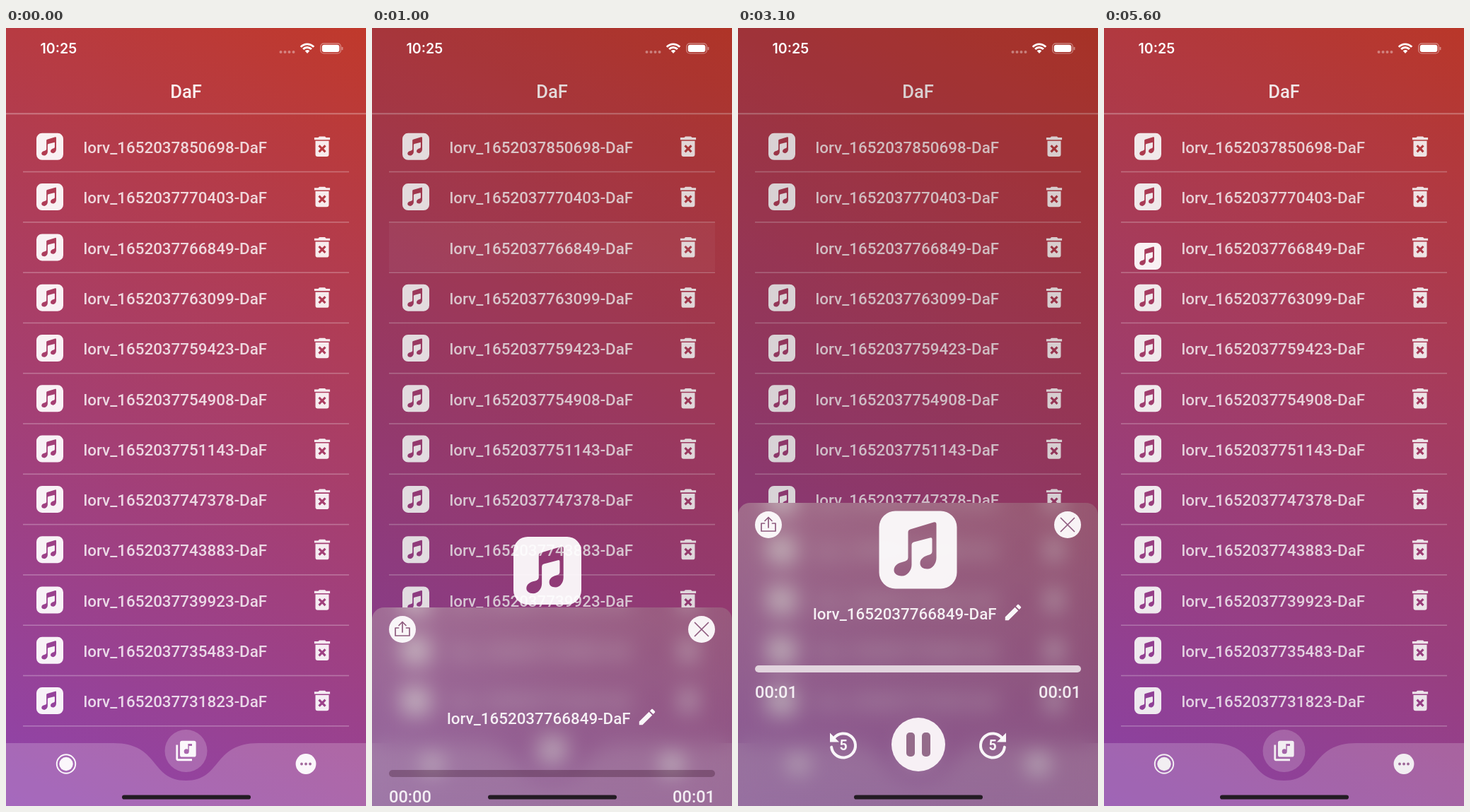
These frames come from a looping animation (509 by 1101 pixels, 5.7 s). An HTML page with a canvas:

```html
<!DOCTYPE html>
<html lang="de">
<head>
<meta charset="utf-8">
<title>DaF</title>
<style>
html, body { margin: 0; width: 100%; height: 100%; overflow: hidden; background: #a03f66; }
canvas { display: block; width: 509px; height: 1101px; }
</style>
</head>
<body>
<canvas id="stage"></canvas>
<script>
const W = 509, H = 1101, LOOP = 5700, STEP = 100;
const PITCH = 71.3, REST = 672;
const SANS = 'Roboto, sans-serif';
const ROW_FONT = '500 22.4px ' + SANS;
const dpr = window.devicePixelRatio || 1;
const view = document.getElementById('stage');
const back = document.createElement('canvas');
for (const c of [view, back]) { c.width = W * dpr; c.height = H * dpr; }
const front = view.getContext('2d');
const scene = back.getContext('2d');

const label = id => `lorv_1652037${id}-DaF`;
const rows = ['850698', '770403', '766849', '763099', '759423', '754908',
  '751143', '747378', '743883', '739923', '735483', '731823'].map(label);
const PICKED = 2;

const NOTE = 'M41 30Q41 27 44 26L77 16Q81 15 81 19V66C81 74 76 82 68 82C62 82 58 79 58 74' +
  'C58 67 64 64 71 62Q75 61 75 57V40Q75 37 72 38L49 44Q46 45 46 48V76C46 84 40 92 32 92' +
  'C25 92 21 88 21 84C21 77 27 73.5 34 72Q41 70.5 41 66Z';
const tilePath = new Path2D(NOTE);
tilePath.roundRect(0, 0, 110, 110, 23);
const trashPath = new Path2D('M6 19a2 2 0 0 0 2 2h8a2 2 0 0 0 2-2V7H6zM8.46 11.88l1.41-1.41L12 12.59' +
  'l2.12-2.12 1.41 1.41L13.41 14l2.12 2.12-1.41 1.41L12 15.41l-2.12 2.12-1.41-1.41L10.59 14z' +
  'M15.5 4l-1-1h-5l-1 1H5v2h14V4z');
const pencilPath = new Path2D('M20.71 7.04c.39-.39.39-1.04 0-1.41l-2.34-2.34c-.37-.39-1.02-.39-1.41 0' +
  'l-1.84 1.83 3.75 3.75zM3 17.25V21h3.75L17.81 9.93l-3.75-3.75z');
const libraryPath = new Path2D('M4 6H2v14a2 2 0 0 0 2 2h14v-2H4zM20 2H8a2 2 0 0 0-2 2v12a2 2 0 0 0 2 2h12' +
  'a2 2 0 0 0 2-2V4a2 2 0 0 0-2-2zM18 7h-3v5.5a2.5 2.5 0 0 1-5 0a2.5 2.5 0 0 1 2.5-2.5' +
  'c.57 0 1.08.19 1.5.5V5h4z');
const barPath = new Path2D('M0 1012H152C218 1012 203 1065 254.5 1065C306 1065 291 1012 357 1012H509V1101H0Z');

// Motion tracks: [ms, value...]
const sheetTrack = [[700, H], [800, 1070], [900, 970], [1000, 820], [1100, 708], [1200, REST],
  [5300, REST], [5400, 726], [5500, 925], [5600, H]];
const dimTrack = [[700, 0], [900, .07], [1200, .13], [5300, .13], [5400, .12], [5600, .035], [5700, 0]];
const tileTrack = [[700, 62, 310.5, 38], [800, 112, 490, 48], [900, 216.5, 732, 71], [1000, 248, 768, 96],
  [1100, 254.5, 748, 107], [1200, 254.5, 738.5, 110], [5300, 254.5, 738.5, 110],
  [5400, 147.5, 611.5, 71], [5500, 84, 420, 47], [5600, 62, 323, 38], [5700, 62, 310.5, 38]];
const pressTrack = [[2000, 1], [2100, .85], [2200, .55], [2300, .62], [2400, .76], [2500, .9], [2600, 1]];
const morphTrack = [[2100, 0], [2200, .12], [2300, .35], [2400, .6], [2500, .82], [2600, 1],
  [3100, 1], [3200, .82], [3300, .6], [3400, .35], [3500, .12], [3600, 0]];

function at(track, ms) {
  if (ms <= track[0][0]) return track[0].slice(1);
  for (let i = 1; i < track.length; i++) {
    const a = track[i - 1], b = track[i];
    if (ms <= b[0]) {
      const k = (ms - a[0]) / (b[0] - a[0]);
      return a.slice(1).map((v, j) => v + (b[j + 1] - v) * k);
    }
  }
  return track[track.length - 1].slice(1);
}

const white = a => `rgba(255,255,255,${a})`;

function disc(g, x, y, r, color) {
  g.fillStyle = color;
  g.beginPath();
  g.arc(x, y, r, 0, Math.PI * 2);
  g.fill();
}

function box(g, x, y, w, h, r, color) {
  g.fillStyle = color;
  g.beginPath();
  g.roundRect(x, y, w, h, r);
  g.fill();
}

function text(g, str, x, y, font, color, align = 'left') {
  g.font = font;
  g.fillStyle = color;
  g.textAlign = align;
  g.fillText(str, x, y);
}

function line(g, pts, width, color) {
  g.strokeStyle = color;
  g.lineWidth = width;
  g.beginPath();
  pts.forEach(([x, y], i) => i ? g.lineTo(x, y) : g.moveTo(x, y));
  g.stroke();
}

// Fills a path drawn on a square grid, centred on x, y
function icon(g, path, x, y, size, grid, color) {
  g.save();
  g.translate(x - size / 2, y - size / 2);
  g.scale(size / grid, size / grid);
  g.fillStyle = color;
  g.fill(path, 'evenodd');
  g.restore();
}

function ripple(g, ms) {
  const k = (ms - 700) / 200;
  if (k < 0 || ms > 1100) return;
  g.save();
  g.beginPath();
  g.rect(24, 276, 461, 68);
  g.clip();
  disc(g, 244, 310.5, 30 + 148 * k, white(ms <= 900 ? .08 : .08 - (ms - 900) / 3000));
  g.restore();
}

function drawList(g, ms) {
  const sky = g.createLinearGradient(W, 0, 0, H);
  sky.addColorStop(0, '#c0392b');
  sky.addColorStop(1, '#8e44ad');
  g.fillStyle = sky;
  g.fillRect(0, 0, W, H);

  text(g, 'DaF', 254.5, 99, '500 25.6px ' + SANS, white(.92), 'center');
  g.fillStyle = white(.3);
  g.fillRect(0, 120.3, W, 2);
  ripple(g, ms);

  rows.forEach((name, i) => {
    const y = 168 + PITCH * i;
    if (i !== PICKED || ms < 700) icon(g, tilePath, 62, y - .2, 38, 110, white(.93));
    text(g, name, 109.5, y + 9, ROW_FONT, white(.8));
    icon(g, trashPath, 447, y - .3, 38, 24, white(.9));
    g.fillStyle = white(.27);
    g.fillRect(24, y + 34.7, 461, 1.6);
  });

  g.fillStyle = white(.2);
  g.fill(barPath);
  disc(g, 254.5, 1023, 30, white(.2));
  icon(g, libraryPath, 254.5, 1023, 34, 24, white(.95));
  disc(g, 85, 1041.5, 9.7, white(.95));
  g.strokeStyle = white(.95);
  g.lineWidth = 2;
  g.beginPath();
  g.arc(85, 1041.5, 13.2, 0, Math.PI * 2);
  g.stroke();
  disc(g, 424, 1041.5, 14.4, white(.95));
  for (const d of [-6, 0, 6]) disc(g, 424 + d, 1041.5, 1.9, '#a2699c');

  g.fillStyle = `rgba(0,0,0,${at(dimTrack, ms)[0]})`;
  g.fillRect(0, 0, W, H);
}

function drawStatus(g) {
  text(g, '10:25', 48.5, 36, '600 19.6px Inter, sans-serif', '#fff');
  for (let i = 0; i < 4; i++) disc(g, 388.5 + 6 * i, 34, 2, white(.38));
  g.strokeStyle = '#fff';
  g.lineWidth = 2.9;
  for (const r of [8, 12.6]) {
    g.beginPath();
    g.arc(426, 35.5, r, -Math.PI * .76, -Math.PI * .24);
    g.stroke();
  }
  g.fillStyle = '#fff';
  g.beginPath();
  g.moveTo(426, 36);
  g.arc(426, 35.5, 4.6, -Math.PI * .76, -Math.PI * .24);
  g.fill();
  g.strokeStyle = white(.45);
  g.lineWidth = 1.2;
  g.beginPath();
  g.roundRect(444.8, 21.8, 28.6, 14.2, 4.5);
  g.stroke();
  box(g, 446.8, 23.8, 24.6, 10.2, 3, '#fff');
  box(g, 474.6, 26.7, 1.8, 4.6, 1, white(.45));
}

function skip(g, x, y, dir) {
  g.save();
  g.translate(x, y);
  g.scale(dir, 1);
  g.strokeStyle = g.fillStyle = white(.94);
  g.lineWidth = 4;
  g.lineCap = 'round';
  g.beginPath();
  g.arc(0, 1.5, 17, -Math.PI * .78, Math.PI * .96);
  g.stroke();
  g.beginPath();
  g.moveTo(-19, -16.5);
  g.lineTo(-19, -3.5);
  g.lineTo(-6, -3.5);
  g.fill();
  g.restore();
  text(g, '5', x, y + 7.5, '700 19.5px ' + SANS, white(.94), 'center');
}

function playButton(g, x, y, ms) {
  const [morph] = at(morphTrack, ms), [press] = at(pressTrack, ms);
  g.save();
  g.translate(x, y);
  g.globalAlpha = press;
  disc(g, 0, 0, 38, '#f7f0f5');
  const mark = '#946b8a';
  const tri = Math.max(0, 1 - morph * 2), bars = Math.min(1, morph * 2);
  if (tri) {
    g.globalAlpha = press * tri;
    g.fillStyle = g.strokeStyle = mark;
    g.lineWidth = 5;
    g.lineJoin = 'round';
    g.beginPath();
    g.moveTo(-11, -15);
    g.lineTo(17, 0);
    g.lineTo(-11, 15);
    g.closePath();
    g.fill();
    g.stroke();
  }
  if (bars) {
    g.rotate((90 - (1 - morph) * 167) * Math.PI / 180);
    g.globalAlpha = press * bars;
    box(g, -17, -17, 34, 12, 5, mark);
    g.globalAlpha = press * bars * (morph < 1 ? .65 : 1);
    box(g, -17, 5, 34, 12, 5, mark);
  }
  g.restore();
}

function drawSheet(g, top, ms) {
  g.save();
  g.beginPath();
  g.roundRect(0, top, W, H, [17, 17, 0, 0]);
  g.clip();
  g.filter = `blur(${15 * dpr}px)`;
  g.drawImage(back, 0, 0, W, H);
  g.filter = 'none';
  const tint = g.createLinearGradient(0, top, W * .7, top + 429);
  tint.addColorStop(0, 'rgba(200,196,180,.36)');
  tint.addColorStop(.5, 'rgba(168,163,152,.31)');
  tint.addColorStop(1, 'rgba(150,146,146,.28)');
  g.fillStyle = tint;
  g.fillRect(0, top, W, H);

  g.translate(0, top - REST);
  const ink = '#8f5c7f', bright = white(.93);
  g.lineCap = g.lineJoin = 'round';
  disc(g, 43, 703, 19, bright);
  line(g, [[37.5, 701], [33, 701], [33, 712], [53, 712], [53, 701], [48.5, 701]], 1.7, ink);
  line(g, [[43, 707], [43, 693]], 1.7, ink);
  line(g, [[38, 697.5], [43, 692.5], [48, 697.5]], 1.7, ink);
  disc(g, 466, 703, 19, bright);
  line(g, [[456.5, 693.5], [475.5, 712.5]], 1.7, ink);
  line(g, [[475.5, 693.5], [456.5, 712.5]], 1.7, ink);

  text(g, rows[PICKED], 106, 837, ROW_FONT, white(.9));
  icon(g, pencilPath, 389, 827, 30, 24, white(.95));

  const done = ms >= 3100 && ms < 5400;
  const played = done ? 1 : ms >= 2800 && ms < 3100 ? .45 : 0;
  box(g, 24, 902, 461, 10, 5, 'rgba(50,10,35,.3)');
  if (played) box(g, 24, 902, 461 * played, 10, 5, '#e2d4de');
  const clock = '500 23.6px ' + SANS;
  text(g, done ? '00:01' : '00:00', 24, 948, clock, white(.88));
  text(g, '00:01', 485, 948, clock, white(.88), 'right');
  skip(g, 149, 1014, 1);
  skip(g, 360, 1014, -1);
  playButton(g, 255, 1014, ms);
  g.restore();
}

function draw(ms) {
  for (const g of [scene, front]) g.setTransform(dpr, 0, 0, dpr, 0, 0);
  drawList(scene, ms);
  front.drawImage(back, 0, 0, W, H);
  drawStatus(front);
  const [top] = at(sheetTrack, ms);
  if (top < H) drawSheet(front, top, ms);
  if (ms >= 700) {
    const [x, y, size] = at(tileTrack, ms);
    icon(front, tilePath, x, y, size, 110, white(.93));
  }
  box(front, 164, 1085.4, 182, 6.2, 3.1, '#231b23');
}

const start = performance.now();
let last = -1;
function tick(now) {
  // The picture refreshes ten times a second
  const ms = Math.floor(Math.max(0, now - start) % LOOP / STEP) * STEP;
  if (ms !== last) draw(last = ms);
  requestAnimationFrame(tick);
}
draw(0);
requestAnimationFrame(tick);
</script>
</body>
</html>
```
